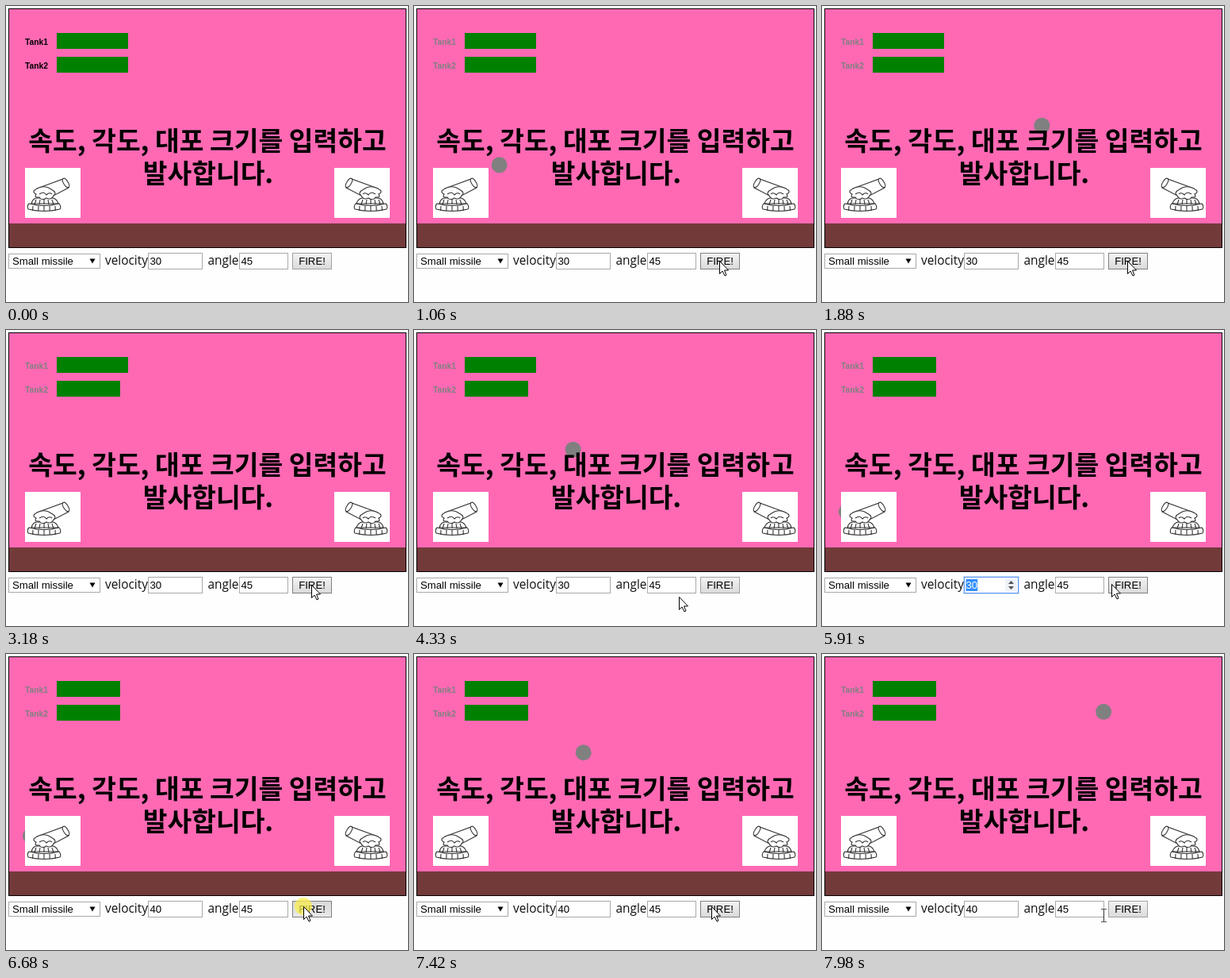
Animation, 507 px wide and 373 px high, one loop 8000 ms. Source, as an HTML page with a canvas:

```html
<!DOCTYPE html>
<html lang="ko">
<head>
<meta charset="utf-8">
<title>Tank game</title>
<style>
html, body { margin: 0; width: 100%; height: 100%; overflow: hidden; background: #fefefe; }
canvas { display: block; }
</style>
</head>
<body>
<canvas id="stage" width="507" height="373"></canvas>
<script>
const ctx = document.getElementById('stage').getContext('2d');
const UI = '13.2px "Liberation Sans", Arial, sans-serif';
const LABEL = '15.4px "Open Sans", "Noto Sans", sans-serif';
const TAG = 'bold 10.3px "Liberation Sans", Arial, sans-serif';
const CAPTION = 'bold 33.4px "Noto Sans CJK KR", "Noto Sans CJK", sans-serif';

const LOOP = 8000;
const TICK = 100;        // one physics step in ms
const FLIGHT = 19;       // steps until a shot lands
const PRESS = 120;       // how long the button is held
const LEFT = 44, RIGHT = 434, MUZZLE_Y = 252;

const shots = [
  { at: 760, x: LEFT, dir: 1, speed: 30 },
  { at: 3140, x: RIGHT, dir: -1, speed: 30 },
  { at: 6790, x: LEFT, dir: 1, speed: 40 }
];
const [first, second, third] = shots;
const landing = shot => shot.at + FLIGHT * TICK;

const edit = { click: 5170, drag: 5250, release: 5560, type: 6000, done: 6150, blur: third.at - PRESS };

const velocityBox = { x: 179, y: 311, w: 69, h: 21 };
const angleBox = { x: 294, y: 311, w: 62, h: 21 };
const fireBox = { x: 361, y: 311, w: 50, h: 21 };

// The pointer rests between these moves.
const entry = { x: 432, y: 366 };
const moves = [
  { from: 320, to: 550, x: 385, y: 321 },
  { from: 4000, to: 4330, x: 334, y: 336 },
  { from: 4330, to: 4600, x: 250, y: 340 },
  { from: 4600, to: 4840, x: 221, y: 322 },
  { from: edit.drag, to: 5500, x: 146, y: 319 },
  { from: edit.release, to: 6050, x: 452, y: 321 },
  { from: 6100, to: 6400, x: 375, y: 318 },
  { from: 7780, to: 7980, x: 355, y: 329 }
];

const between = (t, a, b) => t >= a && t < b;
const inside = (p, b) => p && p.x >= b.x && p.x < b.x + b.w && p.y >= b.y && p.y < b.y + b.h;

function rect(x, y, w, h, color) {
  ctx.fillStyle = color;
  ctx.fillRect(x, y, w, h);
}

function frame(b, color) {
  ctx.strokeStyle = color;
  ctx.lineWidth = 1;
  ctx.strokeRect(b.x + .5, b.y + .5, b.w - 1, b.h - 1);
}

function text(str, x, y, font, color = '#000', align = 'left') {
  ctx.font = font;
  ctx.fillStyle = color;
  ctx.textAlign = align;
  ctx.fillText(str, x, y);
}

function triangle(x, y, half, height, color) {
  ctx.beginPath();
  ctx.moveTo(x - half, y);
  ctx.lineTo(x + half, y);
  ctx.lineTo(x, y + height);
  ctx.fillStyle = color;
  ctx.fill();
}

function disc(x, y, r, color) {
  ctx.beginPath();
  ctx.arc(x, y, r, 0, Math.PI * 2);
  ctx.fillStyle = color;
  ctx.fill();
}

function ballAt(t) {
  const shot = shots.filter(s => t >= s.at).pop();
  if (!shot) return null;
  const n = Math.min(FLIGHT, Math.floor((t - shot.at) / TICK));
  const v = shot.speed * Math.SQRT1_2;
  return { x: shot.x + shot.dir * v * n, y: MUZZLE_Y - v * n + n * (n + 1) };
}

function pointerAt(t) {
  if (t < moves[0].from) return null;
  let p = entry;
  for (const m of moves) {
    const f = Math.min(1, Math.max(0, (t - m.from) / (m.to - m.from)));
    p = { x: p.x + (m.x - p.x) * f, y: p.y + (m.y - p.y) * f };
  }
  return { x: Math.round(p.x), y: Math.round(p.y) };
}

function line(d, fill = 'transparent') {
  const path = new Path2D(d);
  ctx.fillStyle = fill;
  ctx.fill(path);
  ctx.stroke(path);
}

function cannon(x, flip) {
  ctx.save();
  ctx.translate(flip ? x + 70 : x, 204);
  if (flip) ctx.scale(-1, 1);
  rect(0, 0, 70, 63, '#fff');
  ctx.strokeStyle = '#333';
  ctx.lineWidth = 1.1;

  // Barrel with its muzzle
  line('M15 26 L48 14 L55 25 L34 36 Z', '#fff');
  ctx.beginPath();
  ctx.ellipse(51.5, 19, 2.8, 6.5, -.55, 0, Math.PI * 2);
  ctx.fill();
  ctx.stroke();

  // Domed stone base in two rows
  line('M8 45 Q10 38 15 38 L35 38 Q40 39 42 45 Z', '#fff');
  line('M5 45 Q24 50 43 45 Q46 49 44 52 Q24 57 4 52 Q2 48 5 45 Z', '#fff');
  for (let i = -2; i <= 2; i++) {
    line(`M${24 + i * 5} 40 L${24 + i * 6} 46 M${24 + i * 7} 48 L${24 + i * 7.2} 54`);
  }

  // Scalloped mount
  line('M12 28 Q24 20 33 27 Q41 31 36 35 Q33 41 27 38 Q21 42 18 37 Q11 38 14 33 Q9 31 12 28 Z', '#fff');
  line('M18 33 Q24 29 27 34 Q31 30 34 33');
  ctx.restore();
}

function scene(t) {
  rect(0, 0, 507, 373, '#fefefe');
  rect(4, 4, 500, 300, '#ff69b4');
  rect(4, 274, 500, 30, '#733a3a');
  frame({ x: 3, y: 3, w: 502, h: 302 }, '#000');

  const ink = t < first.at ? '#000' : '#808080';
  const hits = [second, first];
  hits.forEach((shot, i) => {
    const y = 34 + i * 30;
    text('Tank' + (i + 1), 24, y + 15, TAG, ink);
    rect(64, y, t < landing(shot) ? 90 : 80, 20, '#008000');
  });

  const ball = ballAt(t);
  if (ball) disc(ball.x, ball.y, 10, '#808080');
  cannon(24, false);
  cannon(414, true);

  text('속도, 각도, 대포 크기를 입력하고', 254, 182, CAPTION, '#000', 'center');
  text('발사합니다.', 255, 223, CAPTION, '#000', 'center');
}

function numberInput(b, value, { focus, hover, selected }) {
  rect(b.x, b.y, b.w, b.h, '#fff');
  frame(b, focus ? '#5b94ee' : '#a9a9a9');
  if (focus) frame({ x: b.x - 1, y: b.y - 1, w: b.w + 2, h: b.h + 2 }, 'rgba(91,148,238,.3)');
  ctx.font = UI;
  const x = b.x + 2.5, width = ctx.measureText(value).width;
  if (selected) rect(x, b.y + 3, width, 15, '#3390ff');
  text(value, x, b.y + 15, UI, selected ? '#fff' : '#000');
  if (focus && !selected) rect(Math.round(x + width), b.y + 3, 1, 15, '#000');
  if (focus || hover) {
    const cx = b.x + b.w - 9.5, cy = b.y + 10.5;
    rect(cx - 7.5, b.y + 3, 15, 15, '#eef2f8');
    for (const side of [-1, 1]) triangle(cx, cy + side * 1.5, 3.5, side * 4, '#505050');
  }
}

function fireButton(hover, down) {
  const b = fireBox;
  const shades = down ? ['#d8d8d8', '#eaeaea'] : ['#f4f4f4', '#dadada'];
  const g = ctx.createLinearGradient(0, b.y, 0, b.y + b.h);
  shades.forEach((color, i) => g.addColorStop(i, color));
  rect(b.x, b.y, b.w, b.h, g);
  frame(b, hover ? '#808080' : '#a2a2a2');
  text('FIRE!', b.x + b.w / 2, 326, UI, '#000', 'center');
}

function controls(t, p, down) {
  const select = { x: 3, y: 312, w: 116, h: 19 };
  rect(select.x, select.y, select.w, select.h, '#fff');
  frame(select, '#a9a9a9');
  text('Small missile', 8, 326, UI);
  triangle(109, 318.5, 3.5, 6, '#000');
  text('velocity', 125, 326, LABEL, '#111');
  text('angle', 254.5, 326, LABEL, '#111');

  numberInput(velocityBox, t < edit.type ? '30' : t < edit.done ? '4' : '40', {
    focus: between(t, edit.click, edit.blur),
    hover: inside(p, velocityBox),
    selected: between(t, edit.drag + PRESS, edit.type)
  });
  numberInput(angleBox, '45', {});
  const hover = inside(p, fireBox);
  fireButton(hover, hover && down);
}

function pointer(t, p, down) {
  if (down) disc(p.x, p.y, 11, 'rgba(250,238,70,.72)');
  const typing = between(t, edit.click, edit.release) || inside(p, velocityBox) || inside(p, angleBox);
  if (typing) {
    rect(p.x, p.y - 7, 1, 15, '#333');
    for (const side of [-8, 8]) rect(p.x - 3, p.y + side, 7, 1, '#555');
    return;
  }
  ctx.save();
  ctx.translate(p.x, p.y + .5);
  ctx.strokeStyle = '#000';
  ctx.lineWidth = 1;
  line('M.5 0 V16 L4 12.5 L7 18.5 L9 17.5 L6.5 11.5 H11.5 Z', '#fff');
  ctx.restore();
}

function draw() {
  const t = performance.now() % LOOP;
  const p = pointerAt(t);
  const down = between(t, edit.click, edit.release) || shots.some(s => between(t, s.at - PRESS, s.at));
  scene(t);
  controls(t, p, down);
  if (p) pointer(t, p, down);
  requestAnimationFrame(draw);
}
draw();
</script>
</body>
</html>
```
